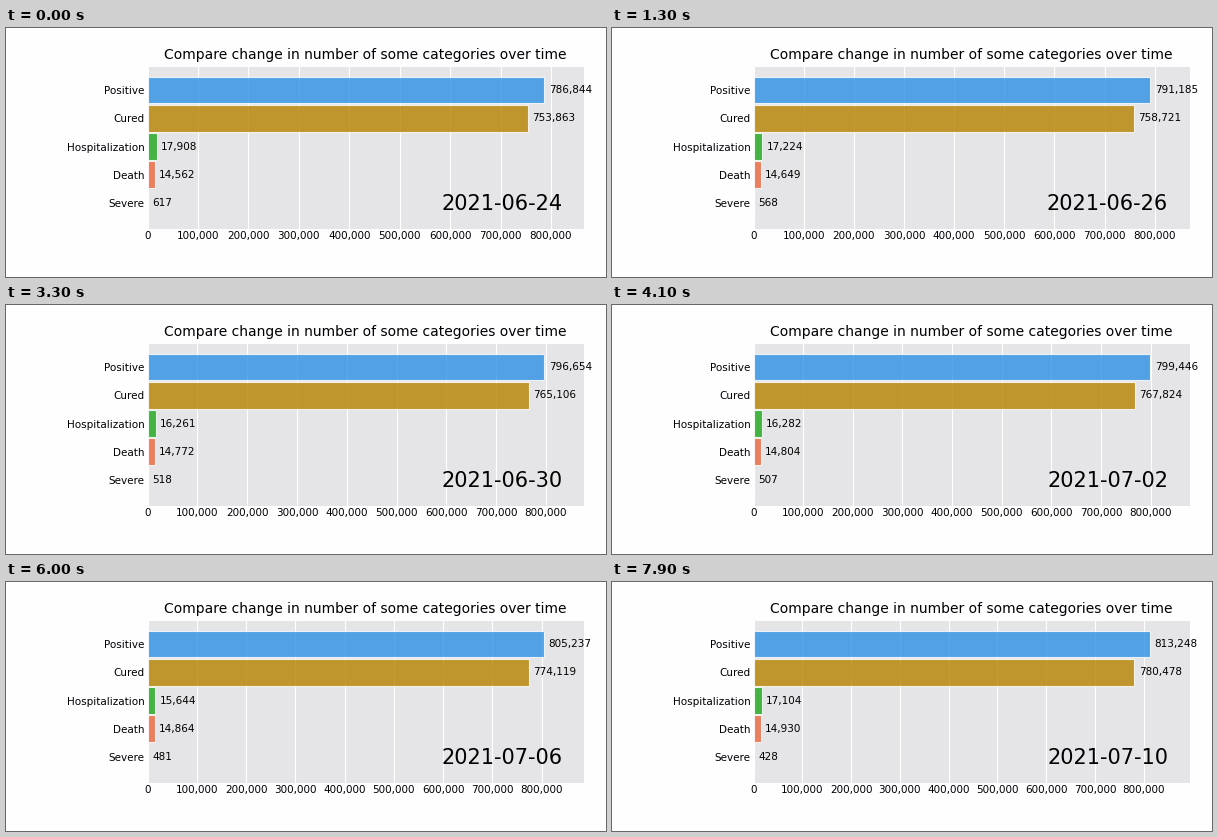
Animation of 600x249 px, one loop 8 s. Source, as a matplotlib script:

```python
import matplotlib.pyplot as plt
import numpy as np
from matplotlib.animation import FuncAnimation
from matplotlib.ticker import MultipleLocator, StrMethodFormatter

W, H, DPI = 600, 249, 100
FRAMES, INTERVAL, STEPS = 80, 100, 5
LEFT, RIGHT, TOP, BOTTOM = 141.5, 578, 39, 200.6
ROW, LAST_ROW = 28.3, 175.2
BG, PANEL = '#fefdff', '#e5e4e6'
START = np.datetime64('2021-06-24')

plt.rcParams.update({'font.family': 'DejaVu Sans', 'font.size': 7.5})

# Daily new positives; the other series are known at a few moments.
gains = [1675, 1695, 1632, 1271, 1002, 1398, 1840, 1725,
         1747, 1847, 1485, 1071, 1700, 2169, 2226, 2256]
positive = 786509 + np.cumsum([0] + gains)
knots = [0.2, 2.8, 4.6, 6.8, 10.2, 12.2, 16]

series = [
    ('Severe', '#DA16FF', knots, [617, 568, 556, 518, 494, 481, 428]),
    ('Death', '#EB663B', knots,
     [14562, 14649, 14689, 14772, 14839, 14864, 14930]),
    ('Hospitalization', '#1CA71C', knots,
     [17908, 17224, 16677, 16261, 16305, 15644, 17104]),
    ('Cured', '#B68100', knots,
     [753863, 758721, 761417, 765106, 770882, 774119, 780478]),
    ('Positive', '#2E91E5', np.arange(17), positive),
]
ranks = np.arange(1, len(series) + 1)

fig = plt.figure(figsize=(W / DPI, H / DPI), dpi=DPI, facecolor=BG)
ax = fig.add_axes([LEFT / W, 1 - BOTTOM / H,
                   (RIGHT - LEFT) / W, (BOTTOM - TOP) / H], facecolor=PANEL)
ax.spines[:].set_visible(False)
ax.set_axisbelow(True)
ax.grid(axis='x', color='white', lw=0.8)
ax.tick_params(length=0, pad=2)
ax.xaxis.set_major_locator(MultipleLocator(100_000))
ax.xaxis.set_major_formatter(StrMethodFormatter('{x:,.0f}'))
ax.set_title('Compare change in number of some categories over time',
             fontsize=10)

bars = ax.barh(ranks, np.zeros(len(series)), height=0.95, alpha=0.8,
               color=[s[1] for s in series], ec='white', lw=0.8)
ax.set_yticks(ranks, [s[0] for s in series])
ax.set_ylim(1 - (BOTTOM - LAST_ROW) / ROW, 1 + (LAST_ROW - TOP) / ROW)
labels = [ax.text(0, r, '', va='center') for r in ranks]
day_label = ax.text(0.95, 0.15, '', transform=ax.transAxes, fontsize=15,
                    ha='right', va='center')


def update(i):
    day = (i + 1) / STEPS
    values = [np.interp(day, xs, ys) for _, _, xs, ys in series]
    limit = max(values) * 1.1
    ax.set_xlim(0, limit)
    for bar, label, value in zip(bars, labels, values):
        bar.set_width(value)
        label.set_x(value + 0.01 * limit)
        label.set_text(f'{value:,.0f}')
    day_label.set_text(str(START + (i + 1) // STEPS))
    return [*bars, *labels, day_label]


anim = FuncAnimation(fig, update, frames=FRAMES, interval=INTERVAL,
                     repeat=True, repeat_delay=0, blit=False)
plt.show()
```
